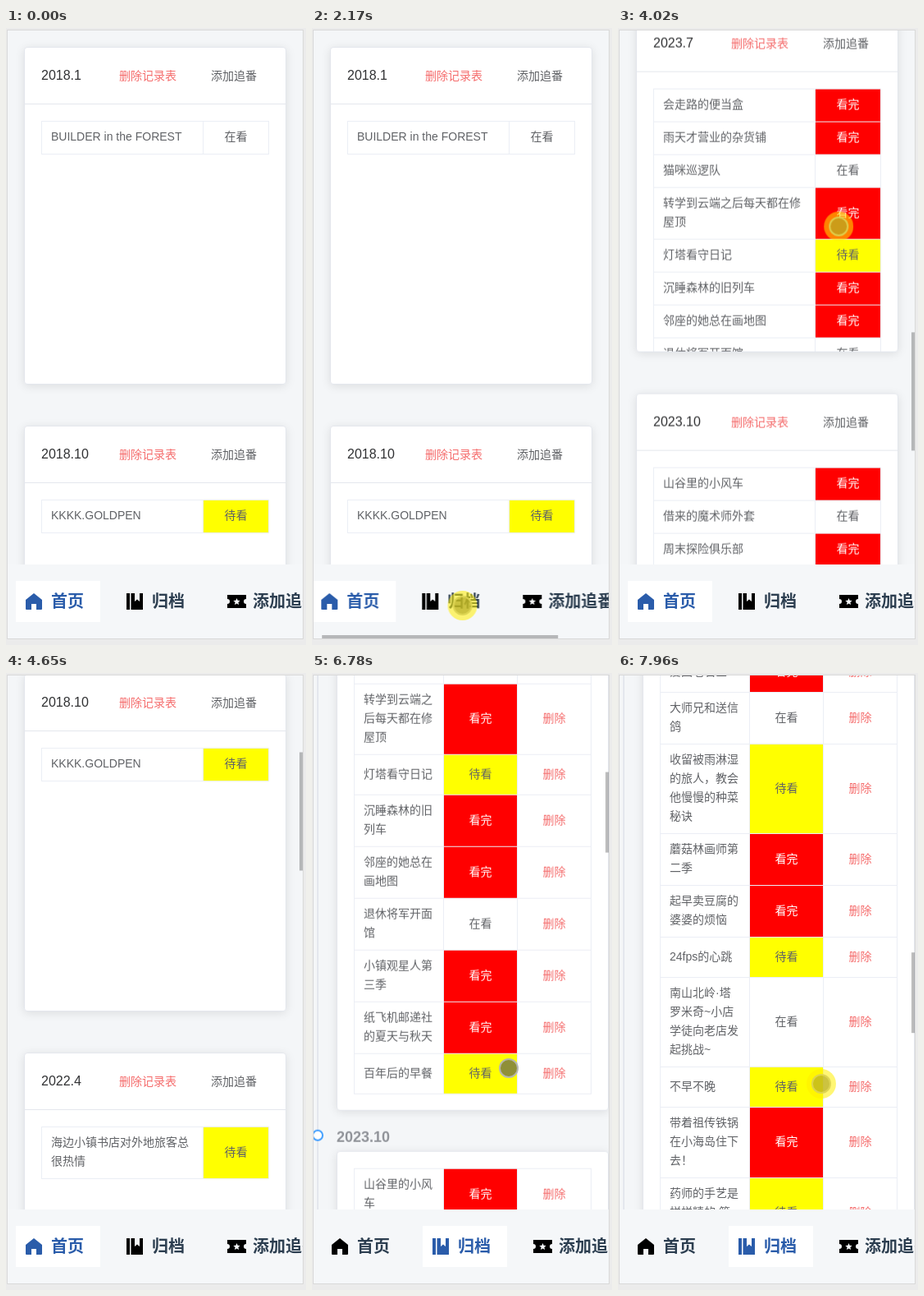
Animation, 366 px wide and 751 px high, one loop 8000 ms. Source, as an HTML page:

```html
<!DOCTYPE html>
<html lang="zh-CN">
<head>
<meta charset="utf-8">
<title>追番记录</title>
<style>
  * { box-sizing: border-box; }
  html, body { margin: 0; width: 100%; height: 100%; overflow: hidden; background: #ebebeb; }
  body { position: relative; font: 14px/23px "Liberation Sans", "Noto Sans CJK SC", "Noto Sans CJK", sans-serif; color: #606266; }
  .frame { position: absolute; left: 1px; top: 2px; width: 362px; height: 742px; border: 1px solid #d9d9d9; background: #f4f6f8; }
  .screen { position: absolute; left: 0; top: 0; width: 366px; height: 751px; clip-path: inset(3px 4px 8px 2px); }
  .page, .page > *, .head > *, .bar, .strip, .tab, .tab > *, .thumb, .cursor, .cursor > * { position: absolute; }
  .page { left: 0; top: 0; width: 366px; }
  .card { background: #fff; border: 1px solid #e4e7ed; border-radius: 4px; box-shadow: 0 2px 12px rgba(0, 0, 0, .1); overflow: hidden; }
  .home .card { left: 22px; width: 320px; height: 411px; }
  .head { position: relative; height: 69px; line-height: 68px; border-bottom: 1px solid #e4e7ed; white-space: nowrap; }
  .head b { left: 20px; font-weight: 400; font-size: 16px; color: #303133; }
  .head i { left: 115px; font-style: normal; }
  .head span { left: 227px; }
  .table { margin: 20px 20px 19px; border: solid #ebeef5; border-width: 1px 0 0 1px; }
  .row { display: flex; border-bottom: 1px solid #ebeef5; }
  .archive .row { min-height: 49px; }
  .cell { display: flex; align-items: center; justify-content: center; flex: none; width: 90px; border-right: 1px solid #ebeef5; padding: 7px 11px 9px; word-break: break-all; }
  .home .cell { width: 80px; }
  .cell.name { justify-content: flex-start; width: 109px; }
  .home .cell.name { width: 197px; }
  .s1 { background: #ff0; }
  .s2 { background: #f00; color: #fff; }
  .remove { color: #f56c6c; }
  .archive .card { left: 30px; width: 332px; }
  .line { left: 6px; top: 30px; width: 2px; background: #e4e7ed; }
  .node { left: 0; width: 14px; height: 14px; border: 2px solid #409eff; border-radius: 50%; background: #fff; }
  .date { left: 30px; font-size: 18px; font-weight: 700; color: #909399; }
  .bar { left: 2px; top: 653px; width: 360px; height: 90px; background: #f5f7f9; overflow: hidden; }
  .strip { left: -2px; top: 0; }
  .tab { top: 20px; height: 50px; color: #2c3e50; font: 700 20px/50px "Liberation Sans", "Noto Sans CJK SC", "Noto Sans CJK", sans-serif; white-space: nowrap; }
  .tab svg { left: 12px; top: 15px; }
  .tab span { left: 43px; }
  .thumb { background: rgba(0, 0, 0, .26); opacity: 0; }
  .side { left: 358px; top: 0; width: 4px; }
  .under { left: 0; top: 739px; width: 288px; height: 4px; }
  .cursor { left: 0; top: 0; opacity: 0; }
  .dot { left: -12px; top: -12px; width: 24px; height: 24px; border-radius: 50%; background: rgba(85, 85, 85, .66); border: 2px solid rgba(190, 190, 190, .85); }
  .halo { left: -18px; top: -18px; width: 36px; height: 36px; border-radius: 50%; background: rgba(255, 238, 0, .55); }
</style>
</head>
<body>
<div class="frame"></div>
<div class="screen">
  <div class="page home"></div>
  <div class="page archive"></div>
  <div class="bar"><div class="strip"></div></div>
  <div class="thumb side" id="homeThumb" style="height:144px"></div>
  <div class="thumb side" id="archiveThumb" style="height:98px"></div>
  <div class="thumb under"></div>
</div>
<div class="cursor"><div class="dot"></div><div class="halo"></div></div>
<script>
const LOOP = 8000, SWITCH = 5760;
const $ = s => document.querySelector(s);
const STATUS = ['在看', '待看', '看完'];

// The leading digit of each title is its status.
const seasons = [
  ['2018.1', ['0BUILDER in the FOREST']],
  ['2018.10', ['1KKKK.GOLDPEN']],
  ['2022.4', ['1海边小镇书店对外地旅客总很热情']],
  ['2022.10', ['2打算当个山中守林人！第一季']],
  ['2023.7', ['2会走路的便当盒', '2雨天才营业的杂货铺', '0猫咪巡逻队', '2转学到云端之后每天都在修屋顶',
    '1灯塔看守日记', '2沉睡森林的旧列车', '2邻座的她总在画地图', '0退休将军开面馆', '2小镇观星人第三季',
    '2纸飞机邮递社的夏天与秋天', '1百年后的早餐']],
  ['2023.10', ['2山谷里的小风车', '0借来的魔术师外套', '2周末探险俱乐部', '2银杏街的修表匠', '1星星搬运工物语',
    '2迷路骑士的菜单', '2被流放的厨子决定去北方开客栈', '0月台上的留声机', '2最后一班摆渡船', '2青苔与铁皮玩偶',
    '2终日擦地板却升到A级', '2远行的苏芮安第一季度', '2隔壁是木匠老师傅', '0FOG 迟到邮差', '2钟楼学堂的守夜人',
    '0老船长的PDMBA钓鱼记', '2爱困老石匠', '0大师兄和送信鸽', '1收留被雨淋湿的旅人，教会他慢慢的种菜秘诀',
    '2蘑菇林画师第二季', '2起早卖豆腐的婆婆的烦恼', '124fps的心跳', '0南山北岭·塔罗米奇~小店学徒向老店发起挑战~',
    '1不早不晚', '2带着祖传铁锅在小海岛住下去！', '1药师的手艺是样样精的 第二季', '0窗台上的仙人掌']],
  ['2024.1', ['0屋檐下的旅行箱', '1夜行巴士食堂']]
];

const table = (titles, extra = '') => `<div class="table">${titles.map(t => `<div class="row">
  <div class="cell name">${t.slice(1)}</div><div class="cell s${t[0]}">${STATUS[t[0]]}</div>${extra}</div>`).join('')}</div>`;

$('.home').innerHTML = seasons.map(([date, titles], i) => `<div class="card" style="top:${23 + 461 * i}px">
  <div class="head"><b>${date}</b><i class="remove">删除记录表</i><span>添加追番</span></div>${table(titles)}</div>`).join('');

const archive = $('.archive');
const add = html => { archive.insertAdjacentHTML('beforeend', html); return archive.lastElementChild; };
const line = add('<div class="line"></div>');
let y = 30;
for (const [date, titles] of seasons) {
  const top = Math.floor(y);
  add(`<div class="node" style="top:${top - 7}px"></div>`);
  add(`<div class="date" style="top:${top - 9}px">${date}</div>`);
  const card = add(`<div class="card" style="top:${top + 19}px">${table(titles, '<div class="cell remove">删除</div>')}</div>`);
  y += 90.5 + card.querySelector('.table').offsetHeight;
}
line.style.height = y - 30 + 'px';

const tabs = [
  [12, 103, '首页', 'M10 0 20 8V19Q20 20 19 20H13V13H7V20H1Q0 20 0 19V8Z'],
  [135, 103, '归档', 'M0 0H4V20H0ZM5.5 0H10V10L13 7.5 16 10V0H20V20H5.5Z'],
  [258, 184, '添加追番记录', 'M0 2H23V7a3 3 0 0 0 0 6V18H0V13a3 3 0 0 0 0-6ZM11.5 6l1.2 2.8 3 .2-2.3 2 .7 3-2.6-1.6-2.6 1.6.7-3-2.3-2 3-.2Z']
];
$('.strip').innerHTML = tabs.map(([x, w, text, d]) => `<div class="tab" style="left:${x}px;width:${w}px">
  <svg width="24" height="20"><path fill-rule="evenodd" d="${d}"/></svg><span>${text}</span></div>`).join('');

// keys: [ms, value, easing]; the first and last values are held to the loop's ends.
function play(el, keys, style) {
  const all = [[0, keys[0][1]], ...keys, [LOOP, keys[keys.length - 1][1]]];
  el.animate(all.map(([t, v, easing = 'linear']) => ({ offset: t / LOOP, easing, ...style(v) })),
    { duration: LOOP, iterations: Infinity });
}
const opacity = v => ({ opacity: v });
const toggle = (el, before, after, style) => play(el, [[SWITCH, before], [SWITCH, after]], style);
const show = (el, spans) => play(el, spans.flatMap(([a, b]) => [[a, 0], [a, 1], [b, 1], [b, 0]]), opacity);

const OUT = 'cubic-bezier(.2,.6,.4,1)';
const homeScroll = [[3130, 0], [3270, 330], [3470, 1303, OUT], [3880, 1980], [3960, 1980], [4200, 1600],
  [4650, 485], [4790, 210, OUT], [5080, 0]];
const archiveScroll = [[6430, 0], [6620, 420], [6860, 1130], [7020, 1720], [7190, 2185, OUT],
  [7680, 2530], [7890, 2556]];
const barScroll = [[1550, 0], [1731, 90], [1900, 90], [2170, 13], [2216, 0]];
const moveY = v => ({ transform: `translateY(${-v}px)` });

play($('.home'), homeScroll, moveY);
play($('#homeThumb'), homeScroll, v => ({ transform: `translateY(${2 + v * .1956}px)` }));
play($('#homeThumb'), [[3130, 0], [3150, 1], [5250, 1], [5500, 0]], opacity);
play(archive, archiveScroll, moveY);
play($('#archiveThumb'), archiveScroll, v => ({ transform: `translateY(${2 + v * .1323}px)` }));
play($('#archiveThumb'), [[6430, 0], [6450, 1], [7990, 1]], opacity);
play($('.strip'), barScroll, v => ({ transform: `translateX(${-v}px)` }));
play($('.under'), barScroll, v => ({ transform: `translateX(${2 + v * .8}px)` }));
play($('.under'), [[1550, 0], [1570, 1], [2550, 1], [2800, 0]], opacity);

toggle($('.home'), 1, 0, opacity);
toggle(archive, 0, 1, opacity);
document.querySelectorAll('.tab').forEach((tab, i) => {
  const paint = on => ({ color: on ? '#2a5caa' : '#2c3e50', backgroundColor: on ? '#fff' : 'rgba(255,255,255,0)' });
  toggle(tab, i === 0, i === 1, paint);
  toggle(tab.querySelector('path'), i === 0, i === 1, on => ({ fill: on ? '#2a5caa' : '#000' }));
});

play($('.cursor'), [
  [720, [332, 765]], [900, [334, 722]], [1200, [304, 700]], [1480, [280, 702]],
  [1550, [280, 702]], [1900, [106, 702]], [2170, [183, 703]], [2310, [262, 702]],
  [2390, [262, 702]], [2860, [269, 557]], [3130, [269, 557]], [3400, [269, 155]], [3470, [269, 150]],
  [3960, [269, 150]], [4200, [270, 510]], [4320, [270, 620]],
  [4900, [216, 765]], [5480, [200, 702]], [5830, [200, 702]], [6090, [237, 732]], [6230, [244, 600]],
  [6430, [243, 600]], [6620, [240, 220]], [6720, [240, 420]], [6860, [240, 560]], [7020, [238, 330]],
  [7190, [238, 439]], [7400, [244, 490]], [7700, [248, 500]]
], ([x, y]) => ({ transform: `translate(${x}px, ${y}px)` }));
show($('.cursor'), [[720, 4320], [4900, 7999]]);
show($('.halo'), [[1550, 2330], [3130, 3400], [3960, 4250], [5620, 5780], [6430, 6620], [6860, 7020], [7890, 7999]]);
</script>
</body>
</html>
```
